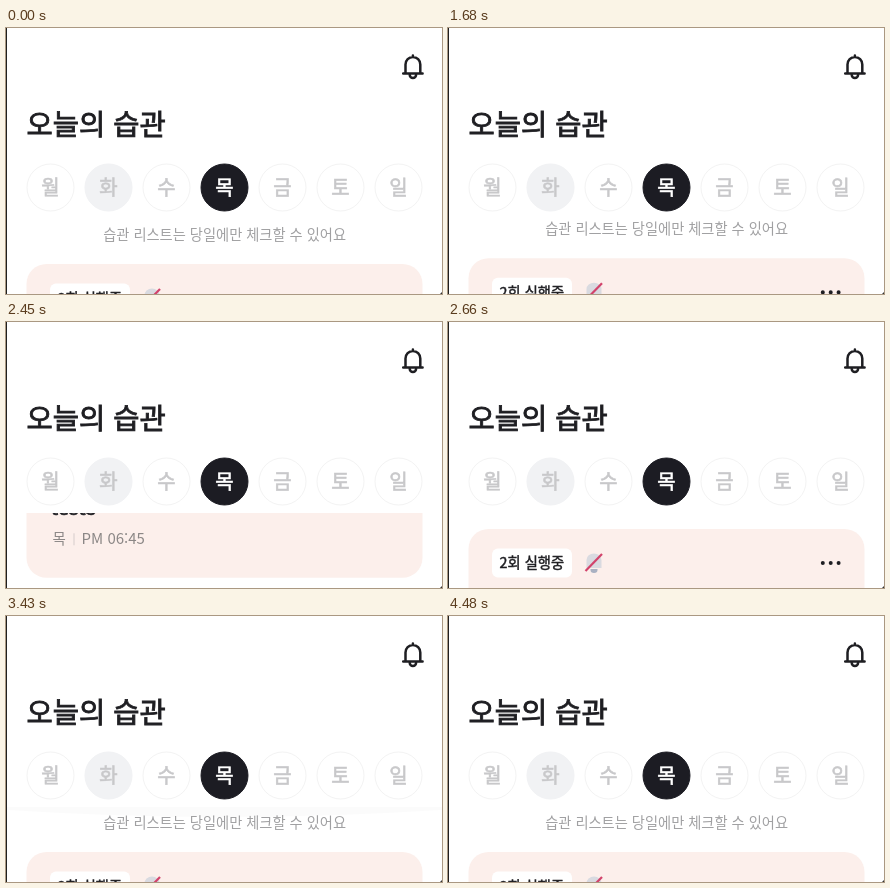
An HTML page for the animation above (5.11 s loop, 436 by 266 pixels).

```html
<!DOCTYPE html>
<html lang="ko">
<head>
<meta charset="utf-8">
<style>
html, body { margin: 0; width: 100%; height: 100%; overflow: hidden; background: #fff; }
svg { display: block; width: 436px; height: 266px; }
text { font-family: "Noto Sans CJK KR", "Noto Sans CJK", sans-serif; }
.mid { text-anchor: middle; }
/* a thin outline gives the medium weight */
.medium { stroke: currentColor; fill: currentColor; stroke-width: .03em; color: #1e1e22; }
</style>
</head>
<body>
<svg viewBox="0 0 436 266">
  <defs><clipPath id="view"><rect y="191" width="436" height="75"/></clipPath></defs>
  <rect width="436" height="266" fill="#fff"/>

  <g fill="none" stroke="#1e1e22" stroke-width="2.5" stroke-linecap="round">
    <path d="M397.2 45.5H416.6M399.5 45V36.5a7.4 7.5 0 0 1 14.8 0V45M406.9 27.6V29"/>
    <path d="M403.7 46.8a3.2 3.2 0 0 0 6.4 0"/>
  </g>
  <text class="medium" x="20.6" y="106.5" font-size="28.5">오늘의 습관</text>
  <g id="days" font-size="20"></g>

  <g clip-path="url(#view)">
    <g id="list">
      <text class="mid" x="218.6" y="212.3" font-size="14.25" fill="#a0a0a2">습관 리스트는 당일에만 체크할 수 있어요</text>
      <g transform="translate(0 236)">
        <rect x="20.5" width="396" height="150" rx="20" fill="#fcefeb"/>
        <rect x="44" y="19.5" width="80" height="29" rx="6" fill="#fff"/>
        <text class="medium" x="51.6" y="39.5" font-size="14.3">2회 실행중</text>
        <path d="M138.5 39V31a7.5 6.5 0 0 1 15 0V39Z" fill="#d9dae0"/>
        <path d="M142.5 40h7v1a3.5 3 0 0 1-7 0Z" fill="#a9b1c2"/>
        <path d="M137.5 42L154 25" stroke="#d2436b" stroke-width="2.2"/>
        <path d="M374.8 34h16" stroke="#1e1e22" stroke-width="4" stroke-linecap="round" stroke-dasharray="0 7.9"/>
        <text class="medium" x="44.5" y="87.5" font-size="20.3">test5</text>
        <g fill="#8b8786">
          <text x="46.5" y="116.5" font-size="14.5">목</text>
          <text x="75.5" y="116.5" font-size="15">PM 06:45</text>
        </g>
        <path d="M68 105.5V117.5" stroke="#d5cccb"/>
      </g>
    </g>
    <path id="glow" d="M0 191V206Q218 277 436 206V191Z"/>
  </g>
  <path d="M.5 0V266" stroke="#202020"/>
  <path d="M436 264V266H434Z" fill="#333"/>
</svg>
<script>
const LOOP = 5110, STEP = 70;
const SCROLL = 142, PEEK = 36, SHADE = .076;
const list = document.getElementById('list');
const glow = document.getElementById('glow');

document.getElementById('days').innerHTML = [...'월화수목금토일'].map((day, i) => {
  const x = 44.5 + 58 * i, today = i === 3;
  const fill = today ? '#1c1c23' : i === 1 ? '#f1f2f4' : '#fff';
  const edge = today || i === 1 ? fill : '#f3f3f3';
  return `<circle cx="${x}" cy="159.5" r="23.5" fill="${fill}" stroke="${edge}"/>
    <text class="mid medium" x="${x}" y="166.7" style="color:${today ? '#fff' : '#c8c8ca'}">${day}</text>`;
}).join('');

// progress from 0 to 1 between two times
const part = (t, from, to) => Math.min(1, Math.max(0, (t - from) / (to - from)));
const ease = (t, from, to) => { const u = part(t, from, to); return u * u * (3 - 2 * u); };
const hump = (t, from, to) => Math.sin(Math.PI * part(t, from, to)) ** 2;

function draw(now) {
  const t = Math.floor(now % LOOP / STEP) * STEP;
  const scroll = SCROLL * (ease(t, 1610, 2185) - ease(t, 2380, 2775)) + PEEK * hump(t, 3710, 3990);
  const pull = .35 * hump(t, 2700, 2870) + part(t, 2940, 3080) - part(t, 3150, 3500);
  list.setAttribute('transform', `translate(0 ${-scroll})`);
  glow.setAttribute('fill-opacity', SHADE * pull);
  glow.setAttribute('transform', `translate(0 ${191 * (1 - pull)}) scale(1 ${pull})`);
}

const start = performance.now();
function tick() {
  draw(performance.now() - start);
  requestAnimationFrame(tick);
}
tick();
</script>
</body>
</html>
```
